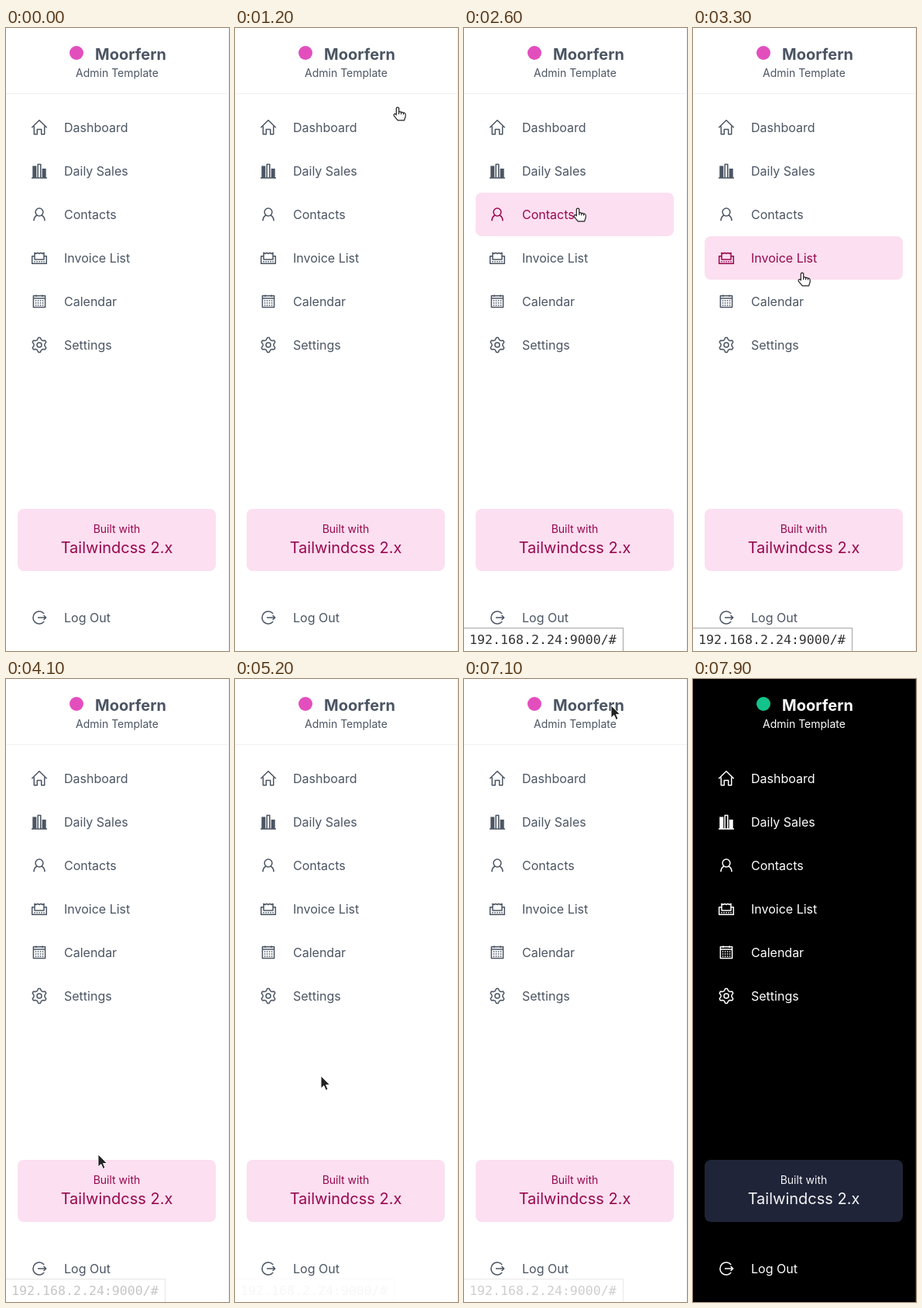
Recreate the animation shown at these times as an HTML page. Size 288 by 802 pixels, loop 8000 ms.

```html
<!DOCTYPE html>
<html lang="en">
<head>
<meta charset="utf-8">
<title>Sidebar</title>
<style>
html, body { margin: 0; width: 100%; height: 100%; overflow: hidden; }
#stage {
  --bg: #fff; --ink: #4b5563; --line: #eff0f3; --edge: #eff0f3;
  --logo: #e24fbd; --card: #fcdff0; --accent: #97084f;
  position: relative; width: 288px; height: 802px; overflow: hidden;
  background: var(--bg); color: var(--ink); font: 16px/24px Inter, sans-serif;
}
#stage.dark {
  --bg: #000; --ink: #fff; --line: #000; --edge: #222;
  --logo: #12c48b; --card: #1f2438; --accent: #f4f4f6;
}
#stage > *, .item > * { position: absolute; }
#stage div { box-sizing: border-box; white-space: nowrap; }
.small { font-size: 14px; line-height: 20px; }
.big { font-size: 20px; line-height: 28px; }
.header { left: -1px; top: 0; width: 289px; height: 85px; padding-top: 48px; border-bottom: 1px solid var(--line); text-align: center; }
.edge { right: 0; top: 0; width: 1px; height: 100%; background: var(--edge); }
.logo { left: 82px; top: 23px; width: 18px; height: 18px; border-radius: 50%; background: var(--logo); }
.title { left: 115px; top: 20px; font-weight: 700; }
.item, .card { left: 15px; width: 256px; border-radius: 8px; }
.item { height: 56px; }
.item span { left: 60px; top: 16px; }
.item.on, .card { background: var(--card); color: var(--accent); }
.card { top: 619px; height: 80px; padding: 16px; text-align: center; }
.icon {
  left: 16px; top: 16px; width: 24px; height: 24px;
  fill: none; stroke: currentColor; stroke-width: 1.5; stroke-linejoin: round;
}
.solid { fill: currentColor; stroke: none; }
.dots { stroke-dasharray: 1.5; }
#status {
  left: -1px; top: 772px; width: 207px; height: 31px; padding-left: 7px;
  border: 1px solid #a5a5a5; background: #fff; color: #333;
  font: 16.6px/29px "DejaVu Sans Mono", monospace;
}
#cursor { left: 0; top: 0; overflow: visible; }
</style>
</head>
<body>
<div id="stage">
  <div class="header small">Admin Template</div>
  <div class="edge"></div>
  <div class="logo"></div>
  <div class="title big">Moorfern</div>
  <div class="card"><div class="small">Built with</div><div class="big">Tailwindcss 2.x</div></div>
  <div id="status">192.168.2.24:9000/#</div>
  <svg id="cursor" width="20" height="20">
    <g id="hand" fill="#fff" stroke="#222" stroke-width="1.2" stroke-linejoin="round">
      <path d="M-1.7 1.2Q0-1 1.7 1.2V6Q3.5 5 4.6 6.6 6.4 5.8 7.5 7.3 10 6.8 10.2 9.5V12L8.6 16.8H.2L-4.8 10.8Q-5.2 8-2.8 8.7L-1.7 9.8Z"/>
      <path d="M1.7 6V9M4.6 6.8V9.2M7.5 7.5V9.5" fill="none"/>
    </g>
    <path id="arrow" d="M0 0V16L3.8 12.6 6.4 18.4 9 17.3 6.5 11.6H11.5Z" fill="#222" stroke="#fff" stroke-width=".9"/>
  </svg>
</div>
<script>
const $ = id => document.getElementById(id);
const path = (d, kind = "") => `<path class="${kind}" d="${d}"/>`;
const clamp = v => Math.min(1, Math.max(0, v));

function gear() {
  const points = Array.from({ length: 24 }, (_, i) => {
    const a = (i * 15 - 7.5) * Math.PI / 180, r = i % 4 < 2 ? 9.5 : 7;
    return `${r * Math.sin(a)} ${-r * Math.cos(a)}`;
  });
  return path(`M${points.join("L")}Z`) + '<circle r="3"/>';
}

const icons = {
  "Dashboard": path("M-9.7.3L0-9.3 9.7.3M-6.7-1.5V8.8H-2.7V2.5H2.7V8.8H6.7V-1.5"),
  "Daily Sales": path("M-8.7-6.5h5V9h-5zM3.7-3h5V9h-5z", "solid") + path("M-1.8 9V-8.6H1.8V9M-10 9H10"),
  "Contacts": '<circle cy="-3" r="4.9"/>' + path("M-7 8.3Q-7 3-2.8 1M7 8.3Q7 3 2.8 1"),
  "Invoice List": path("M-6 2V-6.7l2 1.2 2-1.2 2 1.2 2-1.2 2 1.2 2-1.2V2ZM-6-2.2H-9.3V7.3H9.3V-2.2H6") + path("M-6.7 4.7H6.7", "dots"),
  "Calendar": path("M-7.6-7.2H7.6V7.6H-7.6ZM-7.6-4H7.6M-4-8.6V-6M4-8.6V-6") + path("M-5.2-1H5.5M-5.2 2H5.5M-5.2 5H5.5", "dots"),
  "Settings": gear(),
  "Log Out": path("M6.2-5A8 8 0 1 0 6.2 5M-2 0H8.6M5.6-3L8.7 0 5.6 3")
};

const rows = Object.entries(icons).map(([label, icon], i) => {
  const top = label === "Log Out" ? 731 : 100 + 56 * i;
  $("status").insertAdjacentHTML("beforebegin", `
    <div class="item" style="top:${top}px">
      <svg class="icon" viewBox="-12 -12 24 24">${icon}</svg><span>${label}</span>
    </div>`);
  return { top, element: $("status").previousElementSibling };
});

// Pointer stops: time, x, y; each leg speeds up from its start.
const stops = [
  [1000, 214, 60], [1200, 210, 102], [2600, 147, 232], [4100, 119, 612],
  [4500, 113, 758], [5200, 111, 511], [6200, 126, 221], [6800, 190, 34]
];

function pointer(t) {
  const i = Math.max(1, stops.findIndex(s => s[0] >= t));
  const [a, b] = t > 6800 ? stops.slice(-2) : [stops[i - 1], stops[i]];
  const p = clamp((t - a[0]) / (b[0] - a[0])) ** 2;
  return [a[1] + (b[1] - a[1]) * p, a[2] + (b[2] - a[2]) * p];
}

function hovered(t) {
  const y = pointer(t)[1];
  return rows.findIndex(row => y >= row.top && y < row.top + 56);
}

// Spans of time during which the pointer is over any link.
const visits = [];
for (let t = 0, inside = false; t < 8000; t += 10) {
  const over = hovered(t) >= 0;
  if (over && !inside) visits.push({ start: t });
  if (over) visits.at(-1).end = t;
  inside = over;
}

function statusOpacity(t) {
  return Math.max(...visits.map(v => Math.min(clamp((t - v.start - 90) / 120), 1 - clamp((t - v.end - 230) / 250))));
}

function draw(now) {
  const t = now % 8000;
  const over = hovered(t) >= 0, active = hovered(t - 50);
  $("stage").classList.toggle("dark", t >= 7600);
  rows.forEach((row, i) => row.element.classList.toggle("on", i === active));
  $("cursor").style.display = t >= 1000 && t < 7300 ? "" : "none";
  $("cursor").style.transform = `translate(${pointer(t).map(v => Math.round(v) + "px")})`;
  $("hand").style.display = over ? "" : "none";
  $("arrow").style.display = over ? "none" : "";
  $("status").style.opacity = statusOpacity(t);
  requestAnimationFrame(draw);
}
requestAnimationFrame(draw);
</script>
</body>
</html>
```
